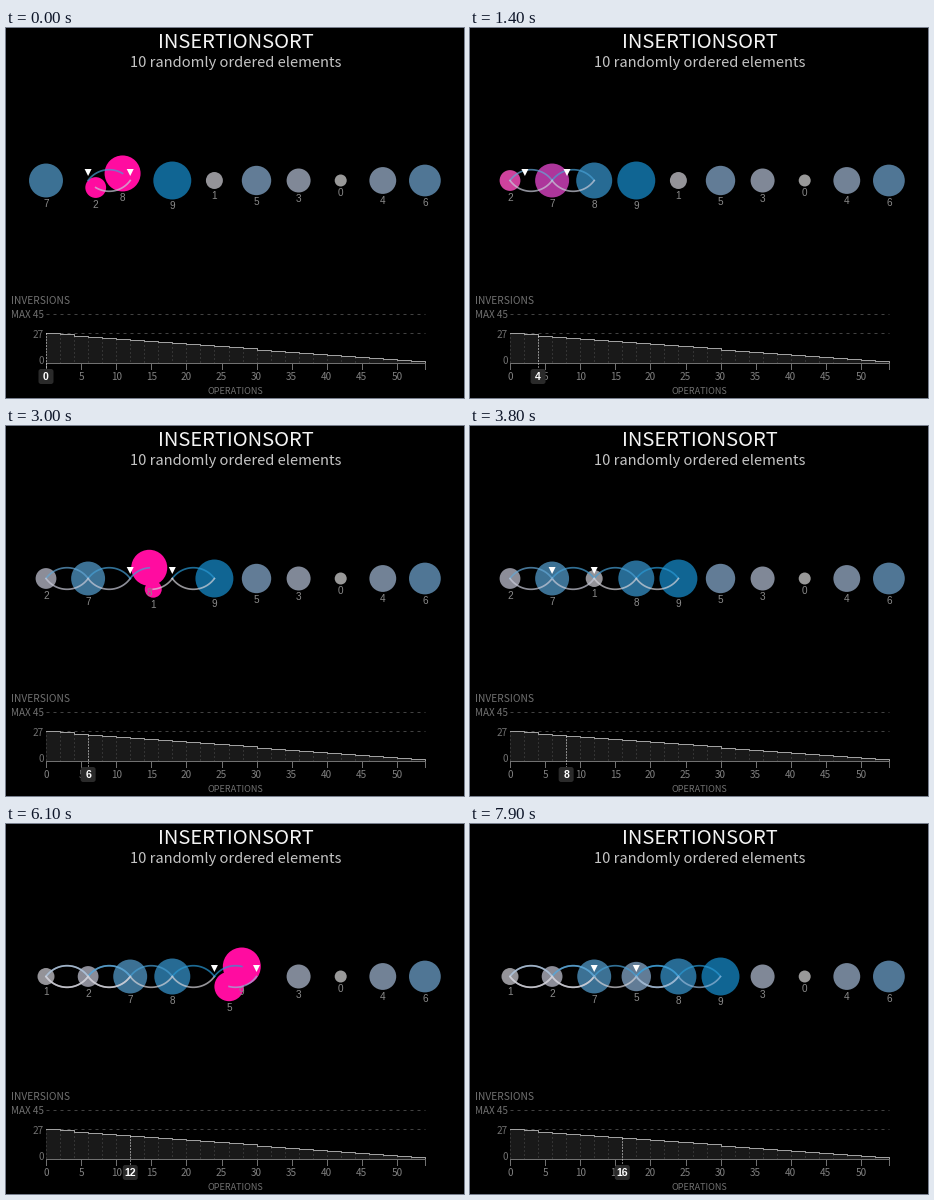
Recreate the animation shown at these times as a matplotlib script. Size 458 by 370 pixels, loop 8 s.

```python
import numpy as np
import matplotlib.pyplot as plt
from matplotlib.animation import FuncAnimation
from matplotlib.patches import Circle, FancyBboxPatch, Polygon

W, H, DPI = 458, 370, 100
FRAMES, STEP = 80, 100
PT = 72 / DPI

START = [7, 8, 2, 9, 1, 5, 3, 0, 4, 6]
FIRST_END, PERIOD, SWAP, FADE = 188, 1023, 500, 450
X0, GAP, CY = 40, 42.1, 152.5
SAG = 10.8
OP, BASE, INV = 7.02, 334.5, 1.08
PINK = np.array([255, 12, 160]) / 255
SANS, ARIAL = "Noto Sans CJK JP", "Liberation Sans"


def insertion_swaps(items):
    """Left index of every swap, in order."""
    a, out = list(items), []
    for i in range(1, len(a)):
        j = i
        while j and a[j - 1] > a[j]:
            a[j - 1], a[j] = a[j], a[j - 1]
            j -= 1
            out.append(j)
    return out


SWAPS = insertion_swaps(START)
TOTAL = len(SWAPS)


def slot(i):
    return X0 + GAP * i


def radius(v):
    return 6 * np.sqrt(1 + v)


def shade(v):
    k = v / 9
    return np.array([153 - 137 * k ** 1.55, 153 - 52 * k, 153 - 6 * k]) / 255


def line_shade(v):
    return np.clip(shade(v) * 1.3 + 0.08, 0, 1)


def ease(p):
    p = np.clip(p, 0, 1)
    return 4 * p ** 3 if p < 0.5 else 1 - 4 * (1 - p) ** 3


def arc(j, f, top):
    """Points on the circular arc between slots j and j+1."""
    half = GAP / 2
    r = (half ** 2 + SAG ** 2) / (2 * SAG)
    ang = np.arcsin(half / r) * (2 * np.asarray(f) - 1)
    dx = r * np.sin(ang)
    dy = r * np.cos(ang) - (r - SAG)
    mid = slot(j) + half
    return (mid + dx, CY - dy) if top else (mid - dx, CY + dy)


fig = plt.figure(figsize=(W / DPI, H / DPI), dpi=DPI, facecolor="black")
ax = fig.add_axes([0, 0, 1, 1])
ax.set_xlim(0, W)
ax.set_ylim(H, 0)
ax.axis("off")


def text(x, y, s, px, color, ha="center", z=2, family=SANS, **kw):
    return ax.text(x, y, s, fontsize=px * PT, color=color, ha=ha,
                   va="baseline", family=family, zorder=z, **kw)


def line(xs, ys, color, px=1.0, z=2, **kw):
    return ax.plot(xs, ys, color=color, lw=px * PT, zorder=z, **kw)[0]


# Headings
text(229.5, 20, "INSERTIONSORT", 20.1, "#f4f4f4")
text(229.5, 39, "10 randomly ordered elements", 14.7, "#c4c4c4")

# Inversions chart
GREY = "#707070"
text(5, 276, "INVERSIONS", 10.2, GREY, "left")
text(38, 290.5, "MAX 45", 9.9, GREY, "right")
text(38, 310, str(TOTAL), 10, GREY, "right")
text(38, 336, "0", 10, GREY, "right")
text(229.5, 366.5, "OPERATIONS", 9.1, GREY)


def op_x(op):
    return X0 + OP * op


def inv_y(v):
    return BASE - INV * v


right = op_x(2 * TOTAL)
for v in (45, TOTAL):
    line([X0, right], [inv_y(v)] * 2, "#424242", dashes=(3, 4))
ops = op_x(2 * np.arange(TOTAL + 1))
levels = inv_y(TOTAL - np.arange(TOTAL + 1))
ax.fill_between(ops, levels, BASE, step="post", color="#191919", lw=0, zorder=1)
for x, y in zip(ops, levels):
    line([x, x], [y, BASE], "#505050", dashes=(1, 3))
line(ops, levels, "#a0a0a0", drawstyle="steps-post", z=3)
line([X0, right], [BASE, BASE], "#707070", z=3)
for x in [op_x(o) for o in range(0, 2 * TOTAL, 5)] + [right]:
    line([x, x], [BASE, 341], "#707070")
for o in range(0, 2 * TOTAL, 5):
    text(op_x(o), 352.5, str(o), 10, "#808080")

# Position marker
marker = line([X0, X0], [306, 341], "#e8e8e8", 1, z=5, dashes=(1, 2))
badge = FancyBboxPatch((X0 - 5.5, 343), 11, 11, boxstyle="round,pad=2,rounding_size=2.5",
                       fc="#2a2a2a", ec="none", zorder=6)
ax.add_patch(badge)
badge_text = text(X0, 352.5, "0", 10.5, "white", z=7, family=ARIAL, weight="bold")

# Elements, trails and pointers
dots = [ax.add_patch(Circle((0, CY), radius(v), lw=0, zorder=10)) for v in range(10)]
names = [text(0, 0, str(v), 10, "#8a8a8a", z=11, family=ARIAL) for v in range(10)]
trails = [[line([], [], "white", 1.7, z=12 + 0.01 * k, alpha=0.7) for _ in range(2)]
          for k in range(TOTAL)]
tips = [ax.add_patch(Polygon([[0, 0]] * 3, fc="white", lw=0, zorder=15))
        for _ in range(2)]


def update(frame):
    t = frame * STEP
    done = max(0, int((t - FIRST_END) // PERIOD) + 1)
    end = FIRST_END + PERIOD * done
    since = t - (end - PERIOD)
    into = t - (end - SWAP)
    f = ease(into / SWAP)
    j = SWAPS[done]

    # Replay finished swaps
    a, pairs = list(START), []
    for k in SWAPS[:done]:
        pairs.append((a[k], a[k + 1]))
        a[k], a[k + 1] = a[k + 1], a[k]
    pairs.append((a[j], a[j + 1]))

    pos = {v: (slot(i), CY) for i, v in enumerate(a)}
    if f > 0:
        pos[a[j]] = arc(j, f, True)
        pos[a[j + 1]] = arc(j, f, False)

    glow = np.zeros(10)
    if done:
        glow[list(pairs[-2])] = np.clip(1 - since / FADE, 0, 1)
    rise = np.clip((into - 40) / 150, 0, 1)
    for v in pairs[-1]:
        glow[v] = max(glow[v], rise)

    for v in range(10):
        x, y = pos[v]
        dots[v].center = (x, y)
        dots[v].set_facecolor(shade(v) * (1 - glow[v]) + PINK * glow[v])
        names[v].set_position((x, y + radius(v) + 10))

    for k, pair in enumerate(trails):
        part = 1 if k < done else f if k == done else 0
        for n, ln in enumerate(pair):
            if part > 0:
                ln.set_data(*arc(SWAPS[k], np.linspace(0, part, 24), n == 0))
                ln.set_color(line_shade(pairs[k][n]))
            else:
                ln.set_data([], [])

    prev = SWAPS[done - 1] if done else j
    at = prev + (j - prev) * ease((since - 50) / 450)
    for n, tip in enumerate(tips):
        x = slot(at + n)
        tip.set_xy([[x - 3.5, 141], [x + 3.5, 141], [x, 148]])

    x = op_x(2 * done)
    marker.set_data([x, x], [inv_y(TOTAL - done), 341])
    badge.set_x(x - 5.5)
    badge_text.set_x(x)
    badge_text.set_text(str(2 * done))
    return []


anim = FuncAnimation(fig, update, frames=FRAMES, interval=STEP,
                     repeat=True, repeat_delay=0, blit=False)
plt.show()
```
